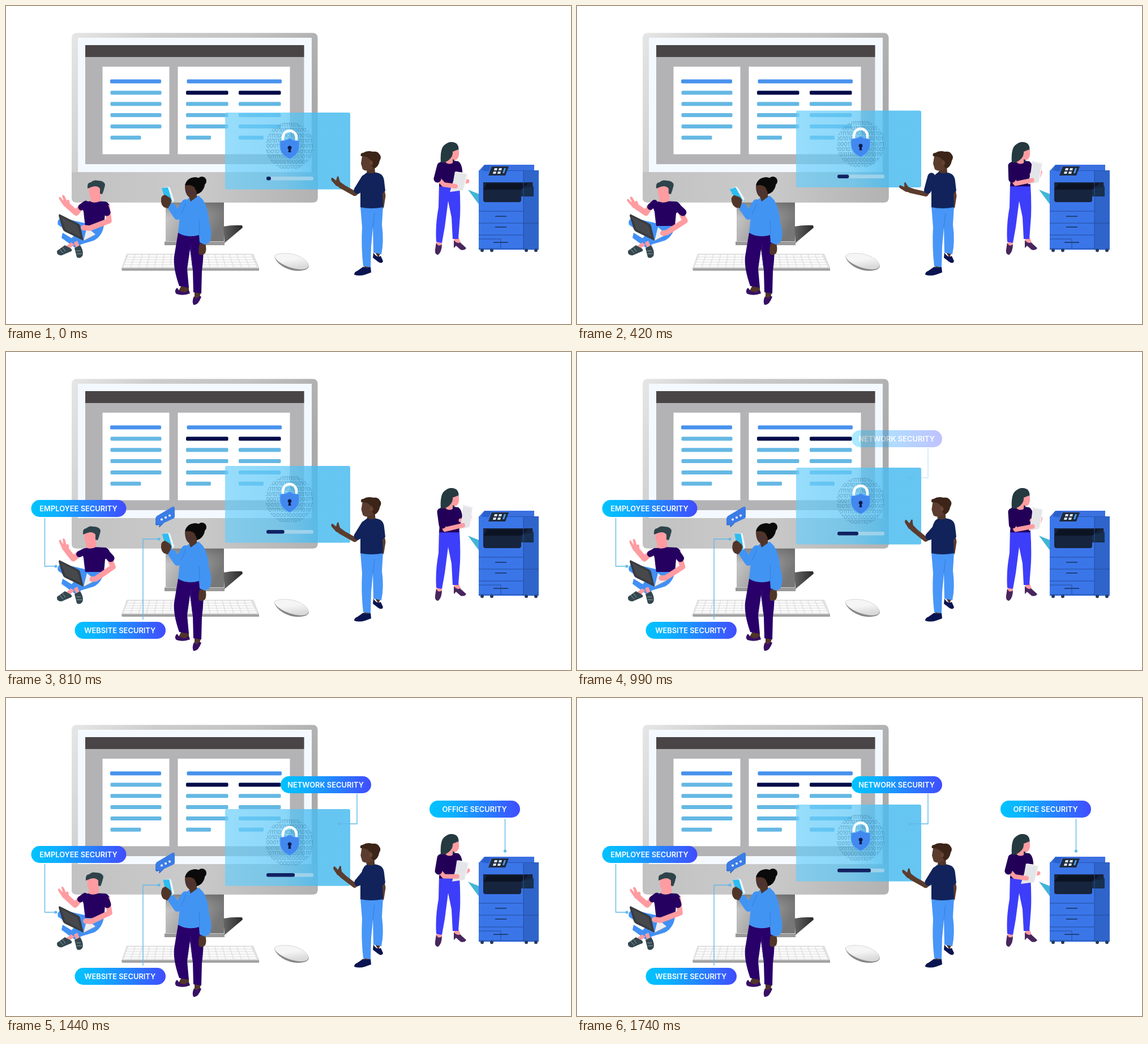
Animation of 998 by 561 pixels, one loop 1860 ms. Source, as an HTML page:

```html
<!DOCTYPE html>
<html lang="en">
<head>
<meta charset="utf-8">
<title>Security overview</title>
<style>
html,body{margin:0;width:100%;height:100%;overflow:hidden;background:#fff}
svg{display:block;width:998px;height:561px}
.label text{font:600 12.9px Inter,sans-serif;fill:#fff;text-anchor:middle}
.label path{fill:none;stroke:#63b9ea;stroke-width:1.4}
.label circle{fill:#63b9ea}
.bits{font:9.5px Inter,sans-serif;fill:#28618a;opacity:.48}
.limb{fill:none;stroke-linecap:round;stroke-linejoin:round}
.pink{fill:#ff9ca1}.pinkArm{stroke:#ff9ca1}
.dark{fill:#513529}.darkArm{stroke:#5b3c2e}
</style>
</head>
<body>
<svg viewBox="0 0 998 561">
<defs>
  <linearGradient id="metal" x2="1" y2=".35">
    <stop stop-color="#e6e6e6"/><stop offset=".3" stop-color="#cdcdcd"/>
    <stop offset=".65" stop-color="#c2c2c2"/><stop offset="1" stop-color="#aaa"/>
  </linearGradient>
  <linearGradient id="chin" x2="1">
    <stop stop-color="#c2c2c2"/><stop offset=".5" stop-color="#cacaca"/><stop offset="1" stop-color="#b2b2b2"/>
  </linearGradient>
  <linearGradient id="stand" x2="1" y2=".4">
    <stop stop-color="#d2d2d2"/><stop offset=".5" stop-color="#a5a5a5"/><stop offset="1" stop-color="#777"/>
  </linearGradient>
  <linearGradient id="shade" x2="0" y2="1">
    <stop stop-color="#555" stop-opacity=".65"/><stop offset=".4" stop-color="#777" stop-opacity="0"/>
  </linearGradient>
  <linearGradient id="foot" x2="1"><stop stop-color="#666"/><stop offset="1" stop-color="#282828"/></linearGradient>
  <linearGradient id="glass" x2="1">
    <stop stop-color="#6bcefa" stop-opacity=".7"/><stop offset=".45" stop-color="#5fc8f7" stop-opacity=".72"/>
    <stop offset=".75" stop-color="#49bbef" stop-opacity=".84"/>
  </linearGradient>
  <linearGradient id="pill" x2="1">
    <stop stop-color="#00c3ff"/><stop offset=".25" stop-color="#0cb2ff"/><stop offset="1" stop-color="#414cff"/>
  </linearGradient>
  <linearGradient id="mouse" x2=".3" y2="1"><stop offset=".5" stop-color="#f5f5f5"/><stop offset="1" stop-color="#dadada"/></linearGradient>
  <clipPath id="disc"><circle cx="501" cy="59" r="42.5"/></clipPath>
</defs>

<g id="monitor">
  <rect x="282" y="344" width="103" height="76" fill="url(#stand)"/>
  <rect x="282" y="344" width="103" height="76" fill="url(#shade)"/>
  <path d="M384 389Q400 386 417 387L418 391L386 418Z" fill="url(#foot)"/>
  <path d="M280 416H386V422H280Z" fill="#999"/>
  <path d="M280 415.500H386" stroke="#ccc"/>
  <rect x="116" y="47.500" width="434.500" height="299" rx="8" fill="url(#metal)"/>
  <path d="M116 293H550.500V338.500Q550.500 346.500 542.500 346.500H124Q116 346.500 116 338.500Z" fill="url(#chin)"/>
  <path d="M127 56H540V293H127Z" fill="#f4f9ff"/>
  <path d="M140 69H526.500V279H140Z" fill="#b3b2b4"/>
  <path d="M140 69H526.500V90H140Z" fill="#494546"/>
  <path d="M170.500 107H288.500V261.500H170.500ZM303.500 107H501.500V261.500H303.500Z" fill="#fff"/>
  <g id="lines"></g>
</g>

<g id="keyboard">
  <path d="M213 437H437L447 461V467H205L204 463Z" fill="#e0e0e0"/>
  <path d="M204 462.500H447V467H205Z" fill="#a2a2a2"/>
</g>
<g id="mouse-device">
  <path d="M474 441C475 452 495 469 520 467C532 466 538 461 533 455L480 442Z" fill="#858585"/>
  <path d="M474 441C478 435 503 434 519 442C533 449 539 459 530 463C515 469 477 455 474 441Z" fill="url(#mouse)" stroke="#c9c9c9" stroke-width=".7"/>
</g>

<g id="panel">
  <rect x="387" width="221" height="135.500" rx="3" fill="url(#glass)"/>
  <g id="bits" class="bits" clip-path="url(#disc)"></g>
  <path d="M489 51V44a12 12 0 0 1 24 0V51" fill="none" stroke="#fff" stroke-width="4.500"/>
  <path d="M501 45Q508 50 518 50V61Q517 75 501 82Q485 75 484 61V50Q494 50 501 45Z" fill="#4288ee" stroke="#60b3f8" stroke-width="1.200"/>
  <path d="M501 58.500a3.500 3.500 0 0 1 1.800 6.500L503.500 70h-5L499.200 65a3.500 3.500 0 0 1 1.800-6.500Z" fill="#0b1a4c"/>
  <rect x="460" y="113" width="83" height="6.500" rx="3" fill="#add7ed" opacity=".8"/>
  <rect id="bar" x="460" y="113" height="6.500" rx="3" fill="#102262"/>
</g>

<g id="sitter">
  <path d="M92 386C89 376 97 373 104 375L139 383H173C173 398 164 412 151 415L124 423L112 414L120 405Z" fill="#4190f5"/>
  <path d="M100 400L133 420L124 428L98 409Z" fill="#4190f5"/>
  <path d="M106 424L115 417L121 421L111 429ZM120 417L126 414L130 424L124 427Z" class="pink"/>
  <path d="M104 422L115 428Q119 432 112 434L98 440Q89 440 90 432ZM121 427L131 422Q138 433 135 441Q130 447 125 443Z" fill="#34474f"/>
  <path d="M95 429L101 436M100 426L105 433M124 432H132M125 437H134" stroke="#b9c6cc" stroke-width=".7"/>
  <g id="wave">
    <path d="M133 354L124 365L109 352" class="limb pinkArm" stroke-width="10"/>
    <path d="M103 354L94 341Q92 336 96 337L102 344L99 335Q101 331 104 336L107 343Q111 340 112 344L113 352Z" class="pink"/>
    <path d="M141 349L133 355" class="limb" stroke="#250060" stroke-width="11"/>
  </g>
  <path d="M132 349Q143 344 154 344L176 345Q184 348 183 357L175 366L173 388H140Q138 374 137 363Z" fill="#250060"/>
  <g id="sitterHead">
    <path d="M150 331H167V344Q157 349 149 345Z" class="pink"/>
    <path d="M146 317H167Q170 325 167 334Q164 340 157 340Q149 340 147 332Z" class="pink"/>
    <path d="M144 322Q143 311 150 311Q155 306 162 308Q174 308 175 316Q173 325 170 332L166 331V322Q161 316 152 319Z" fill="#2e434a"/>
  </g>
  <path d="M137 414L143 390L158 403Z" fill="#eceef2"/>
  <path d="M137 414L157 404" stroke="#9ba2af"/>
  <path id="typingArm" class="limb pinkArm" stroke-width="9.500"/>
  <path id="typingSleeve" class="limb" stroke="#250060" stroke-width="13"/>
  <path d="M94 367L128 384Q130 385 131 388L137 414L104 398Q101 396 100 393L93 370Z" fill="#383b40"/>
  <path d="M97 372L126 387L132 408L105 394Z" fill="#46484b"/>
</g>

<g id="caller">
  <path d="M311 491L323 496V505Q312 509 303 506ZM333 503L344 506Q342 517 333 522Z" class="dark"/>
  <path d="M302 497Q307 505 316 505L323 501L325 507Q313 512 301 508Q296 503 302 497ZM332 512Q336 519 342 511L345 513Q339 529 331 527Q328 521 332 512Z" fill="#371064"/>
  <path d="M304 400H349Q350 438 346 468L345 507L331 505L330 467L325 429L320 464L323 497L306 494Q295 463 297 442Z" fill="#290069"/>
  <path d="M326 420L329 458" stroke="#49248a" stroke-width=".7"/>
  <path d="M342 419Q339 430 341 438Q347 441 352 436Q355 428 352 419Z" class="dark"/>
  <path d="M313 348L327 335H341L348 342Q357 356 359 382Q366 405 359 417L351 421L342 417L341 404Q320 410 304 400L307 371Z" fill="#4294f3"/>
  <path d="M317 348L303 370L293 355" class="limb" stroke="#4294f3" stroke-width="14" stroke-linecap="butt"/>
  <path d="M318 347L309 368M341 377L342 404" stroke="#3178d1" fill="none" stroke-width=".8"/>
  <path d="M322 332L337 326V337L326 345Z" class="dark"/>
  <circle cx="346" cy="309" r="8" fill="#0b0a0b"/>
  <path d="M316 316Q320 302 335 302Q350 304 351 317Q348 329 337 332L328 324Z" fill="#0b0a0b"/>
  <path d="M316 317Q326 314 333 320L337 329Q334 340 325 338Q316 334 316 317Z" class="dark"/>
  <path d="M317 323L321 329L326 326M326 326a4 3 0 1 0 7 1" fill="none" stroke="#372e70" stroke-width=".8"/>
  <g id="phone">
    <path d="M275 321L286 319Q289 319 290 322L297 343L294 347L283 347Z" fill="#edf6fd"/>
    <path d="M275 321L286 320L294 346L283 348Z" fill="#2fbcf0"/>
    <path d="M274 341Q274 334 281 333L289 338Q295 343 289 352L286 357L279 355Q273 350 274 341Z" class="dark"/>
  </g>
</g>

<g id="presenter">
  <path d="M664 318L667 335L664 354" class="limb darkArm" stroke-width="7"/>
  <path d="M632 456H644V466L635 471ZM650 432L662 434L658 444Z" class="dark"/>
  <path d="M631 460Q637 464 644 460L645 470L634 474Q624 477 615 474Q615 469 621 467ZM649 435Q655 445 662 441L666 450Q664 456 657 451L648 444Z" fill="#0a1450"/>
  <path d="M626 353H666L664 386Q668 415 663 438L649 435L648 391L645 424L644 461L631 459Q627 424 629 390Z" fill="#4896f7"/>
  <path d="M648 390L651 365" stroke="#2f73cb" fill="none" stroke-width=".7"/>
  <path d="M633 297Q638 294 640 291L655 294Q667 296 668 309L670 326L665 331L666 355Q645 359 626 355V325Q626 307 633 297Z" fill="#11235a"/>
  <g id="point">
    <path d="M625 323L616 331L591 317" class="limb darkArm" stroke-width="8.500"/>
    <path d="M594 322L583 317L575 308Q573 303 577 303L583 308L585 301Q588 299 588 304L590 310L598 316Z" fill="#5b3c2e"/>
    <path d="M634 304L621 325" class="limb" stroke="#11235a" stroke-width="13" stroke-linecap="butt"/>
  </g>
  <g id="presenterHead">
    <path d="M639 282H651L652 294Q645 297 637 293Z" class="dark"/>
    <path d="M629 265H651L649 286Q638 294 630 288L627 278Z" fill="#5b3c2e"/>
    <path d="M627 265Q625 259 631 259Q638 254 648 257Q657 256 660 262Q664 266 660 273Q658 284 650 287L645 281Q649 272 643 271Q638 264 627 265Z" fill="#3c2418"/>
    <ellipse cx="645" cy="277" rx="3" ry="4" fill="#684433"/>
  </g>
</g>

<g id="printer">
  <path d="M816 324L836 332V351Z" fill="#42b5d5"/>
  <path d="M835 291L845 280H933V291Z" fill="#3a70e0"/>
  <path d="M835 290H914V430H835Z" fill="#3b76e9"/>
  <path d="M914 291H941V430H914Z" fill="#2f65ca"/>
  <path d="M884 290.500H941" stroke="#2654b4"/>
  <path d="M843 311H930L932 336H910V342Q910 346 906 346H847Q843 346 843 342Z" fill="#17243e"/>
  <path d="M850 313H922L910 324H843Z" fill="#0c1424"/>
  <path d="M910 323L932 318V336H910Z" fill="#17304f"/>
  <path d="M845 281H857L852 292L840 290Z" fill="#2a60cb"/>
  <path d="M858 283H888L882 299H852Z" fill="#202b3c"/>
  <path d="M863 286h5l-1 4h-5zM871 286h5l-1 4h-5zM861 292h5l-1 4h-5zM869 292h5l-1 4h-5z" fill="#ddeafa"/>
  <path d="M880 286h3l-3 9h-3z" fill="#4d9eea"/>
  <path d="M835 362H914M835 383H941M835 404H914M835 411H874V428M835 428H914M914 291V430" fill="none" stroke="#224c9e" stroke-width="1"/>
  <path d="M864 371H884M864 390H884M861 417H887" stroke="#20427d" stroke-width="2"/>
  <g fill="#263a61"><circle cx="841" cy="431" r="3"/><circle cx="858" cy="431" r="3"/><circle cx="919" cy="431" r="3"/><circle cx="936" cy="431" r="3"/></g>
</g>

<g id="clerk">
  <path d="M761 411L770 413L769 425L761 427ZM790 407H799L804 420L795 422Z" class="pink"/>
  <path d="M760 417Q762 424 768 422L770 420Q770 434 763 439Q757 438 758 430ZM791 413Q797 420 802 417L813 427Q810 432 803 430L795 423L791 427Z" fill="#47265d"/>
  <path d="M765 315H801Q803 345 802 371L799 411H789L787 373L781 344L775 390L770 418L760 416Q758 387 764 355Z" fill="#3d3efa"/>
  <path d="M765 318H800" stroke="#2929bb"/>
  <path d="M769 274Q778 274 782 272L799 274Q807 280 806 298L801 311L800 318H765L766 304L764 284Q765 276 769 274Z" fill="#230057"/>
  <path d="M768 276Q766 250 776 244Q785 237 795 242Q801 247 799 258L791 275Z" fill="#253a40"/>
  <path d="M778 266L792 252L798 251Q803 262 797 270Q793 273 789 270V277Q781 281 776 275Z" class="pink"/>
  <path d="M775 276Q790 269 789 257L799 253Q800 242 787 240Q770 240 768 277Z" fill="#253a40"/>
  <path id="backArm" class="limb pinkArm" stroke-width="7"/>
  <g id="sheet"><path d="M-7 -18L15 -13L7 15L-16 18L-10 -1Z" fill="#e4e5e8"/><path d="M-5 -17L15 -14L8 14" fill="none" stroke="#f5f5f6" stroke-width="2"/></g>
  <path id="frontArm" class="limb pinkArm" stroke-width="8"/>
  <path id="clerkSleeve" class="limb" stroke="#230057" stroke-width="13" stroke-linecap="butt"/>
</g>

<g id="bubble">
  <path d="M267 289L294 273Q298 272 298 276V290Q298 293 295 294L278 302L271 309V304L267 306Q264 306 264 303V294Q264 291 267 289Z" fill="#3b7ce6"/>
  <path d="M264 303Q265 306 271 304V309L278 302" fill="none" stroke="#285cc0"/>
  <g fill="#fff"><circle cx="275" cy="295.500" r="2"/><circle cx="282" cy="292" r="2"/><circle cx="289" cy="288.500" r="2"/></g>
</g>
<g id="labels"></g>
</svg>
<script>
const $ = id => document.getElementById(id);
const set = (id, name, value) => $(id).setAttribute(name, value);
const rect = (x, y, w, h, r, fill) => `<rect x="${x}" y="${y}" width="${w}" height="${h}" rx="${r}" fill="${fill}"/>`;

// Document text lines
let lines = rect(184, 129.5, 90, 7, 2, '#4892ed') + rect(319.5, 129.5, 167.5, 7, 2, '#4892ed');
for (let i = 0; i < 5; i++) {
  const y = 149.5 + i * 19.8, last = i === 4;
  lines += rect(184.5, y, last ? 54 : 90, 7, 2, '#65b8e3');
  for (const x of [318, 411]) lines += rect(x, y, last ? 44 : 74.5, 7, 2, i ? '#65b8e3' : '#030c49');
}
$('lines').innerHTML = lines;

// Keycaps, in perspective
let keys = '';
for (let row = 0; row < 5; row++) {
  const y = 439 + row * 4.5, left = 215 - row * 1.8, w = (220 + row * 4) / 17;
  for (let i = 0; i < 17; i++) {
    if (row === 4 && i > 4 && i < 9) continue;
    keys += rect(left + i * w, y, w - 1.4, 3.6, 1, '#fafafa');
  }
  if (row === 4) keys += rect(left + 5 * w, y, 4 * w - 1.4, 3.6, 1, '#fafafa');
}
$('keyboard').innerHTML += keys;

let seed = 17;
const random = () => (seed = seed * 16807 % 2147483647) / 2147483647;
let bits = '';
for (let row = 0; row < 9; row++) {
  const digits = Array.from({length: 17}, () => random() < .52 ? 0 : 1).join('');
  bits += `<text x="501" y="${25 + row * 9.3}" text-anchor="middle">${digits}</text>`;
}
$('bits').innerHTML = bits;

const labels = [
  [420, 'EMPLOYEE', 44.5, 261, 168, 'M68.500 293V378H86', 88, 378],
  [690, 'WEBSITE', 121.5, 476, 160.5, 'M242 472V330H268', 270, 330],
  [960, 'NETWORK', 485, 138, 160, 'M620 169V222H590', 588, 222],
  [1290, 'OFFICE', 748, 181, 160, 'M881.500 213V268', 881.5, 270]
];
$('labels').innerHTML = labels.map(([, word, x, y, w, line, cx, cy]) =>
  `<g class="label"><path d="${line}"/><circle cx="${cx}" cy="${cy}" r="2.6"/>
  ${rect(x, y, w, 30, 15, 'url(#pill)')}<text x="${x + w / 2 - .5}" y="${y + 20.2}">${word} SECURITY</text></g>`).join('');
const labelNodes = [...$('labels').children];

const span = 1740, times = [0, 240, 570, 810, 1200, 1440, span];

// Smooth cyclic curve through one value per pose time
function curve(t, ...v) {
  const n = v.length - 1;
  const i = Math.min(n - 1, times.filter(k => k <= t).length - 1);
  const slope = k => {
    const a = k % n, before = (a + n - 1) % n;
    const gap = times[a + 1] - times[a] + times[before + 1] - times[before];
    return (v[a + 1] - v[before]) / gap;
  };
  const d = times[i + 1] - times[i], u = (t - times[i]) / d, s = u * u * (3 - 2 * u);
  return v[i] + (v[i + 1] - v[i]) * s + d * u * (1 - u) * (slope(i) * (1 - u) - slope(i + 1) * u);
}
const fade = (t, start) => Math.max(0, Math.min(1, (t - start) / 90));

function draw(t) {
  set('panel', 'transform', `translate(0 ${curve(t, 188, 182, 189, 201, 204, 196, 188)})`);
  set('bar', 'width', 8 + 51 * t / span);

  const lean = curve(t, 0, -2, -6, -8, -7, -3, 0);
  set('sitterHead', 'transform', `translate(${lean})`);
  const wave = curve(t, 0, -10, -1, 11, 3, 1, 0);
  set('wave', 'transform', `translate(${lean * .6}) rotate(${wave} 126 363)`);
  const elbow = curve(t, 182, 188, 192, 189, 184, 183, 182);
  const hand = curve(t, 0, 10, 17, 15, 8, 4, 0);
  set('typingArm', 'd', `M179 355L${elbow} 379L${148 + hand * .7} ${392 + hand * .55}L${137 + hand} ${391 + hand * .65}`);
  set('typingSleeve', 'd', `M174 352L${elbow - 4} 364`);

  set('phone', 'transform', `rotate(${curve(t, 0, -14, -8, 1, 12, 5, 0)} 283 347)`);
  set('point', 'transform', `rotate(${curve(t, 0, -14, -15, 0, 17, 8, 0)} 619 330)`);
  set('presenterHead', 'transform', `translate(${curve(t, 0, 1.5, 2, .5, -1.5, -.7, 0)})`);

  // The sheet turns edge-on as it is lifted
  const dx = curve(t, 0, 6, 12, 13, 7, 3, 0), dy = curve(t, 0, -10, -20, -19, -11, -5, 0);
  set('sheet', 'transform', `translate(${800 + dx} ${310 + dy}) scale(${1 - dx * .02} ${1 + dx * .016})`);
  set('backArm', 'd', `M803 297L${811 + dx * .5} ${310 + dy * .6}L${815 + dx * .35} ${309 + dy}`);
  set('frontArm', 'd', `M${761 + dx * .7} 302L${773 + dx * .2} ${315 + dy * .1}L${794 + dx} ${318 + dy * .65}`);
  set('clerkSleeve', 'd', `M768 282L${762 + dx * .7} 305`);

  labelNodes.forEach((node, i) => node.setAttribute('opacity', fade(t, labels[i][0])));
  set('bubble', 'opacity', fade(t, 420));
}

const start = performance.now();
function tick(now) {
  const t = Math.max(0, now - start) % 1860;
  draw(Math.min(span, Math.floor(t / 30) * 30));
  requestAnimationFrame(tick);
}
draw(0);
requestAnimationFrame(tick);
</script>
</body>
</html>
```
